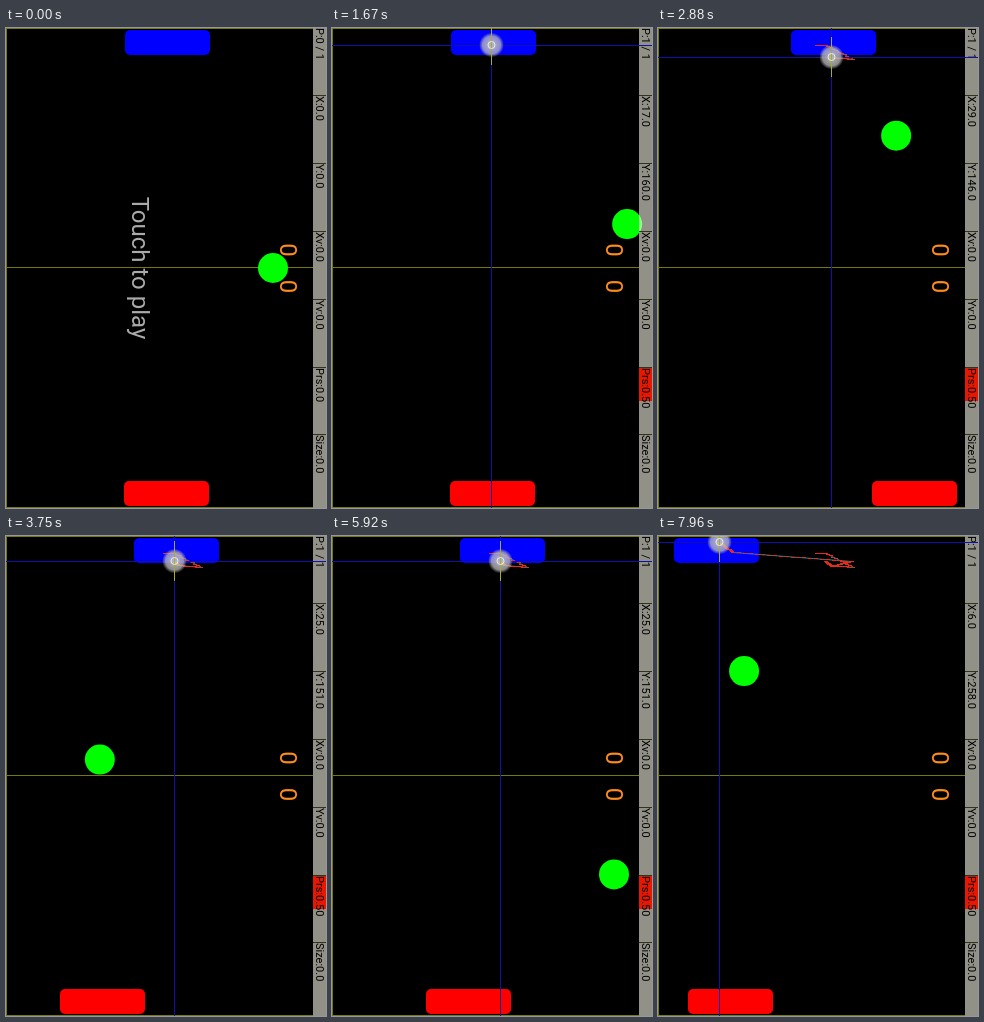
Write an HTML page with a canvas that moves like this. It is 320x480 px and loops after 8 s.

```html
<!DOCTYPE html>
<html lang="en">
<head>
<meta charset="utf-8">
<title>Paddle game</title>
<style>
  html, body { margin: 0; width: 100%; height: 100%; overflow: hidden; background: #000; }
  canvas { display: block; width: 320px; height: 480px; }
</style>
</head>
<body>
<canvas id="stage" width="320" height="480"></canvas>
<script>
const ctx = document.getElementById('stage').getContext('2d');
const LOOP = 8000, TOUCH_START = 1450, PADDLE_LEAD = 140;
const FONT = 'Roboto, "Noto Sans", sans-serif';

// Key points are [time, value, ...]; travel between them is straight.
// The ball turns sideways at walls and paddles, vertically only at paddles.
const ballX = [
  [1470, 267], [1720, 302], [2380, 255], [2490, 303], [4190, 21],
  [5361, 212], [6089, 303], [7593, 115], [8000, 83]
];
const ballY = [[1470, 240], [2380, 41], [5361, 438], [7593, 41], [8000, 145]];
const finger = [
  [1900, 159, 17], [2150, 168, 17], [2450, 196, 31], [2800, 173, 29],
  [3030, 173, 29], [3300, 168, 25], [6100, 168, 25], [6250, 174, 30],
  [6600, 194, 25], [7000, 194, 25], [7600, 75, 16], [8100, 56, 2]
];
const redX = [
  [2380, 160], [2880, 256], [3750, 96], [4120, 40], [4880, 184],
  [5361, 208], [6200, 96], [7593, 96], [7960, 72]
];

function at(path, t) {
  if (t <= path[0][0]) return path[0].slice(1);
  const i = path.findIndex(p => p[0] > t);
  if (i < 0) return path[path.length - 1].slice(1);
  const a = path[i - 1], b = path[i], k = (t - a[0]) / (b[0] - a[0]);
  return a.slice(1).map((v, n) => v + (b[n + 1] - v) * k);
}

function rect(color, x, y, w, h) {
  ctx.fillStyle = color;
  ctx.fillRect(x, y, w, h);
}

function disc(color, x, y, r) {
  ctx.fillStyle = color;
  ctx.beginPath();
  ctx.arc(x, y, r, 0, 7);
  ctx.fill();
}

function paddle(color, center, y) {
  ctx.fillStyle = color;
  ctx.beginPath();
  ctx.roundRect(Math.round(center) - 42, y, 85, 25, 5);
  ctx.fill();
}

function sideText(text, x, y, size, color, align = 'left') {
  ctx.save();
  ctx.translate(x, y);
  ctx.rotate(Math.PI / 2);
  ctx.font = `${size}px ${FONT}`;
  ctx.textAlign = align;
  ctx.fillStyle = color;
  ctx.fillText(text, 0, 0);
  ctx.restore();
}

function drawField() {
  rect('#000', 0, 0, 320, 480);
  const line = '#77770c';
  rect(line, 0, 0, 307, 1);
  rect(line, 0, 479, 307, 1);
  rect(line, 0, 0, 1, 480);
  rect(line, 0, 239, 307, 1);
  for (const y of [222, 258.5]) sideText('0', 274, y, 24, '#ff8c1a', 'center');
}

function drawReadout(touching, x, y) {
  rect('rgba(255,255,240,.57)', 307, 0, 13, 480);
  if (touching) rect('#e81800', 307, 340, 13, 33);
  const labels = touching
    ? ['P:1 / 1', `X:${y}.0`, `Y:${319 - x}.0`, 'Xv:0.0', 'Yv:0.0', 'Prs:0.50', 'Size:0.0']
    : ['P:0 / 1', 'X:0.0', 'Y:0.0', 'Xv:0.0', 'Yv:0.0', 'Prs:0.0', 'Size:0.0'];
  labels.forEach((label, i) => {
    const top = Math.round(i * 67.9);
    if (i) rect('#33331c', 307, top - 1, 13, 1);
    sideText(label, 310, top, 11, '#000');
  });
}

function drawTrail(t) {
  ctx.strokeStyle = '#1687a5';
  ctx.lineWidth = 1;
  ctx.beginPath();
  for (let s = TOUCH_START; s < t; s += 30) {
    const [x, y] = at(finger, s);
    ctx.lineTo(x, y + 0.5);
  }
  ctx.stroke();
  for (let s = TOUCH_START; s < t; s += 30) {
    const [x, y] = at(finger, s).map(Math.round);
    rect('#e62a14', x - 2, y, 4, 1);
  }
}

function drawTouch(x, y) {
  rect('#1010aa', 0, y, 320, 1);
  rect('#1010aa', x, 0, 1, 480);
  const cx = x + 0.5;
  const glow = ctx.createRadialGradient(cx, y, 2, cx, y, 12);
  glow.addColorStop(0, 'rgba(205,205,205,.85)');
  glow.addColorStop(0.7, 'rgba(185,185,190,.75)');
  glow.addColorStop(1, 'rgba(160,160,170,.15)');
  disc(glow, cx, y, 12);
  rect('#a4ad32', x, y - 20, 1, 40);
  ctx.strokeStyle = '#eeeed0';
  ctx.lineWidth = 1;
  ctx.beginPath();
  ctx.arc(cx, y, 3.5, 0, 7);
  ctx.stroke();
}

function draw(t) {
  const touching = t >= TOUCH_START;
  const [x, y] = at(finger, t).map(Math.round);
  drawField();
  paddle('#00f', at(finger, t + PADDLE_LEAD)[0] + 2, 2);
  paddle('#f00', Math.round(at(redX, t)[0] / 8) * 8, 453);
  disc('#0f0', at(ballX, t)[0], at(ballY, t)[0], 15);
  drawReadout(touching, x, y);
  if (touching) {
    drawTrail(t);
    drawTouch(x, y);
  } else {
    sideText('Touch to play', 126, 240, 24, '#aaa', 'center');
  }
}

const start = performance.now();
function tick() {
  draw((performance.now() - start) % LOOP);
  requestAnimationFrame(tick);
}
tick();
</script>
</body>
</html>
```
